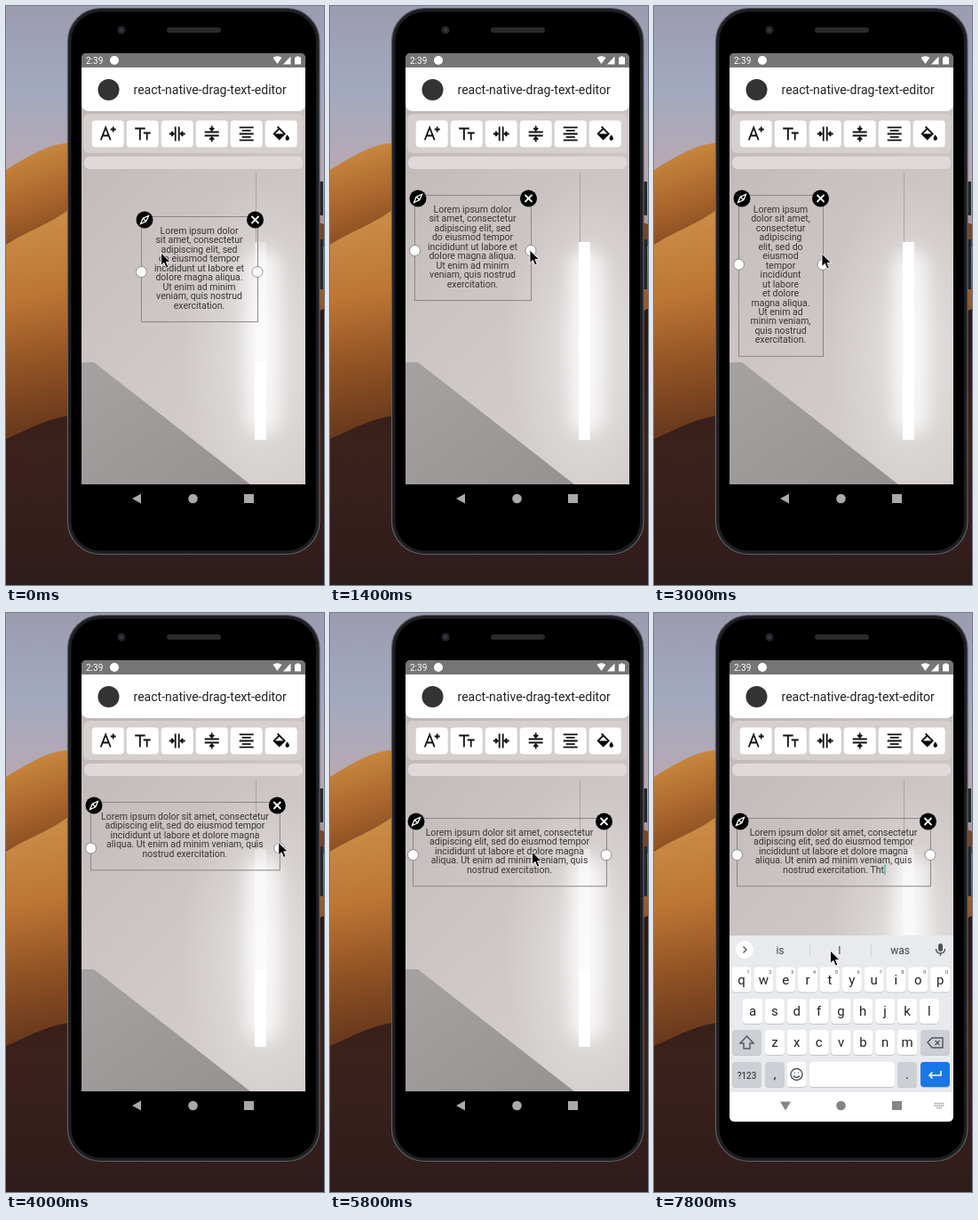
Write an HTML page that moves like this. It is 358x650 px and loops after 8000 ms.

```html
<!DOCTYPE html>
<html>
<head>
<meta charset="utf-8">
<style>
html, body { margin: 0; width: 100%; height: 100%; overflow: hidden; background: #2b1a18; }
svg { display: block; width: 358px; height: 650px; font-family: Roboto, sans-serif; }
.mid { text-anchor: middle; }
.line { fill: none; stroke: #111; stroke-width: 1.8; }
.thin { fill: none; stroke: #50555a; stroke-width: 1.4; }
</style>
</head>
<body>
<svg id="stage" viewBox="0 0 358 650">
  <defs>
    <linearGradient id="sky" x2="0" y2="1"><stop stop-color="#9c9bb0"/><stop offset=".35" stop-color="#a2a9bf"/><stop offset=".7" stop-color="#b9a9b2"/><stop offset="1" stop-color="#a58c92"/></linearGradient>
    <linearGradient id="duneA" gradientUnits="userSpaceOnUse" x1="15" y1="165" x2="50" y2="275"><stop stop-color="#c9883f"/><stop offset=".5" stop-color="#a9652c"/><stop offset="1" stop-color="#7a441f"/></linearGradient>
    <linearGradient id="duneB" gradientUnits="userSpaceOnUse" x1="10" y1="250" x2="50" y2="470"><stop stop-color="#c98b46"/><stop offset=".35" stop-color="#bd7534"/><stop offset=".7" stop-color="#8f5224"/><stop offset="1" stop-color="#6b3a1d"/></linearGradient>
    <linearGradient id="duneC" x2="0" y2="1"><stop stop-color="#2a1713"/><stop offset=".5" stop-color="#3c211c"/><stop offset="1" stop-color="#2f1c1b"/></linearGradient>
    <linearGradient id="wall" x2=".5" y2="1"><stop stop-color="#bcb5b4"/><stop offset=".45" stop-color="#c9c2c1"/><stop offset="1" stop-color="#d3cecc"/></linearGradient>
    <linearGradient id="floor" x2="1" y2="1"><stop stop-color="#a5a2a1"/><stop offset="1" stop-color="#959291"/></linearGradient>
    <radialGradient id="glow"><stop stop-color="#fff"/><stop offset=".35" stop-color="#fff" stop-opacity=".6"/><stop offset="1" stop-color="#fff" stop-opacity="0"/></radialGradient>
    <filter id="soft" x="-1" y="-.3" width="3" height="1.6"><feGaussianBlur stdDeviation="9"/></filter>
    <clipPath id="screen"><path d="M85 59q0-6 6-6H331q6 0 6 6V565q0 6-6 6H91q-6 0-6-6z"/></clipPath>
    <clipPath id="photo"><path d="M85 53H337V537H85z"/></clipPath>
  </defs>

  <rect width="358" height="270" fill="url(#sky)"/>
  <path d="M0 184C20 172 45 155 70 154L358 245V460H0z" fill="url(#duneA)"/>
  <path d="M0 268C25 252 45 247 70 229L358 270V500H0z" fill="url(#duneB)"/>
  <path d="M0 486C25 476 45 462 80 459L358 340V650H0z" fill="url(#duneC)"/>

  <path d="M353 197h4v38h-4zM353 262h4v56h-4z" fill="#24262a"/>
  <rect x="69.500" y="2.500" width="283.500" height="613" rx="37" fill="#1d1f22" stroke="#5d6065" stroke-width="1.200"/>
  <rect x="73.500" y="6.500" width="275.500" height="605" rx="33"/>
  <rect x="181" y="24" width="61" height="6" rx="3" fill="#292a2b"/>
  <circle cx="130" cy="27" r="4.5" fill="#222529"/><circle cx="130" cy="27" r="1.8" fill="#3a4047"/>

  <g clip-path="url(#screen)">
    <g clip-path="url(#photo)">
      <rect x="85" y="53" width="252" height="484" fill="url(#wall)"/>
      <ellipse cx="288" cy="378" rx="92" ry="185" fill="url(#glow)" opacity=".5"/>
      <rect x="270" y="274" width="38" height="206" rx="16" fill="#fff" opacity=".75" filter="url(#soft)"/>
      <path d="M85 400H99L275 537H85z" fill="url(#floor)"/>
      <path d="M281.5 187V265" stroke="#aaa5a4"/>
      <rect x="280" y="400" width="13" height="87" rx="1" fill="#fff"/>
      <rect id="tube" x="280" y="265" width="13" height="136" rx="1" fill="#fff"/>
    </g>

    <rect x="85" y="53" width="252" height="17" fill="#757575"/>
    <text x="90" y="65" font-size="10" fill="#fff">2:39</text>
    <circle cx="122" cy="61" r="5" fill="#fff"/>
    <path d="M300.500 58q5-3.500 10 0L305.500 65zM320.500 56.500V65.500H312zM325 57.500h2v-1h3v1h2V65.500h-7z" fill="#fff"/>

    <path d="M85 69H337V109q0 9-9 9H94q-9 0-9-9z" fill="#fff"/>
    <circle cx="115.500" cy="94" r="12" fill="#333"/>
    <text x="143.500" y="99" font-size="14.050" fill="#222">react-native-drag-text-editor</text>

    <rect x="87" y="121" width="248" height="44" rx="6" fill="#d5cfce"/>
    <rect x="88" y="169" width="246" height="14" rx="6" fill="#dfdad9"/>
    <g id="tools"></g>

    <g id="nav" transform="translate(0 553)" fill="#a9a9a9">
      <path d="M142 0L152-5.500V5.500z"/><circle cx="210.500" r="5.300"/><rect x="268" y="-5" width="11" height="10"/>
    </g>

    <g id="editor">
      <g id="copy" class="mid" font-size="10.5" fill="#383435"></g>
      <path id="caret" d="M0-9.500V2" stroke="#1f9c92"/>
      <g id="frame">
        <rect id="edge" x=".5" y=".5" fill="none" stroke="#8b8787"/>
        <circle class="grip" r="6" fill="#fff" stroke="#777" stroke-width=".8"/>
        <circle class="grip" r="6" fill="#fff" stroke="#777" stroke-width=".8"/>
        <g transform="translate(4 4)"><circle r="9.500"/><path d="M4.500-4.500L1.800 1.800L-4.500 4.500L-1.800-1.800zM-1.800-1.800L1.800 1.800" fill="none" stroke="#fff" stroke-width="1.300"/></g>
        <g id="close"><circle r="9.500"/><path d="M-4-4L4 4M4-4L-4 4" stroke="#fff" stroke-width="1.800"/></g>
      </g>
    </g>

    <g id="keyboard">
      <rect x="85" y="362" width="252" height="177" fill="#e8eaed"/>
      <rect x="85" y="538" width="252" height="33" fill="#fff"/>
      <g id="keys"></g>
      <circle cx="102" cy="378" r="10" fill="#fff"/>
      <path id="chevron" class="thin"/>
      <g id="icons" class="thin">
        <path d="M129 373h11v7l-4 4h-7zM140 380h-4v4M132 377h1M136 377h1M132 380q2 2 4 0"/>
        <path d="M201.500 374h9v10.500h-9zM204 372.500h4v2.500h-4M203.500 378h5M203.500 381h5"/>
        <circle cx="242" cy="378" r="3.600" stroke-width="2.400"/><circle cx="242" cy="378" r="5.400" stroke-dasharray="2.100 2.140" stroke-width="1.800"/>
        <path d="M282 378h.1M286.500 378h.1M291 378h.1" stroke-width="2.400" stroke-linecap="round"/>
        <text x="170" y="381.500" class="mid" font-size="9.500" font-weight="700" fill="#50555a" stroke="none">GIF</text>
      </g>
      <g id="hints" class="mid" font-size="12" fill="#3c4043">
        <path d="M175.500 371v15M244.500 371v15" stroke="#d3d6d9"/>
        <text x="142" y="382.500">is</text><text x="209" y="382.500">I</text><text x="277" y="382.500">was</text>
      </g>
      <rect x="320" y="371" width="5" height="9" rx="2.500" fill="#50555a"/>
      <path class="thin" d="M317.500 377q0 5 5 5t5-5M322.500 382v3"/>
      <g transform="translate(0 553)" fill="#858585">
        <path d="M142-4.500H154L148 5.500z"/><circle cx="210.500" r="5.300"/><rect x="268" y="-5" width="11" height="10"/>
        <path d="M315.500-2.500h11M315.500 0h11M318 2.500h6" stroke="#999" stroke-width="1.400" stroke-dasharray="1.600 .7"/>
      </g>
    </g>
  </g>
  <path id="pointer" d="M0 0V14.500L3.400 11.300L5.800 17L8.300 16L5.900 10.400H10.500z" stroke="#fff" stroke-width=".9"/>
</svg>
<script>
const $ = id => document.getElementById(id);
const show = (id, on) => { $(id).style.display = on ? '' : 'none'; };
const move = (el, x, y) => el.setAttribute('transform', `translate(${x} ${y})`);

// Eased value between [time, ...values] stops
function at(stops, t) {
  let i = 0;
  while (i < stops.length - 2 && t >= stops[i + 1][0]) i++;
  const [t0, ...a] = stops[i], [t1, ...b] = stops[i + 1];
  const k = Math.max(0, Math.min(1, (t - t0) / (t1 - t0)));
  const e = k * k * (3 - 2 * k);
  return a.map((v, j) => v + (b[j] - v) * e);
}

const LOOP = 8000, LEAD = 10.45, GRIP_LAG = 160;
const words = ('Lorem ipsum dolor sit amet, consectetur adipiscing elit, sed do eiusmod tempor ' +
  'incididunt ut labore et dolore magna aliqua. Ut enim ad minim veniam, quis nostrud exercitation.').split(' ');

// Words per line, up to each box width
const wraps = [
  [104, '231131112223221'], [122, '231232323321'], [160, '333343431'],
  [188, '5255541'], [210, '545661'], [999, '66672']
];
const wrapFor = w => wraps.find(r => w < r[0])[1];
const heightFor = w => 24 + wrapFor(w).length * LEAD;

const boxPos = [[0, 152, 236], [150, 152, 236], [560, 95, 212], [4350, 95, 212], [4800, 93, 230]];
const boxWidth = [[0, 131], [1400, 131], [2050, 197], [2400, 197], [3000, 95], [3300, 95], [4100, 218]];
const fade = [[0, 1], [4800, 1], [4950, .24], [5150, .24], [5300, 1]];
const pointerPath = [
  [0, 174.5, 277], [150, 174.5, 277], [600, 153.5, 272.5], [1000, 160, 272], [1400, 225, 274],
  [2050, 291, 260], [2200, 309.5, 266], [2400, 292, 262], [3000, 189, 278], [3300, 189, 290],
  [4100, 312, 256], [4350, 229, 250], [4800, 227.5, 268], [5900, 227.5, 268], [6400, 194, 412],
  [6800, 194, 412], [7500, 198.5, 379]
];
const typed = [[6800, ' '], [7150, ' T'], [7400, ' Th'], [7600, ' Tht']];

const tools = [
  'M-8 7L-2.500-7L3 7M-6 2H1M3-5H9M6-8V-2',
  'M-8.500-6H3M-2.800-6V7M1-1H9M5-1V7',
  'M-2-8V8M2-8V8M-9 0H-4M9 0H4M-6.500-2.500L-4 0L-6.500 2.500M6.500-2.500L4 0L6.500 2.500',
  'M-8-2H8M-8 2H8M0-9V-4M0 9V4M-2.500-6.500L0-4L2.500-6.500M-2.500 6.500L0 4L2.500 6.500',
  'M-8-7.200H8M-5-3.600H5M-8 0H8M-5 3.600H5M-8 7.200H8',
  'M-4-8L4 0L-2 6L-8 0L-2-6'
];
const paint = '<path d="M-8 0H4L-2 6zM7 1q4.500 5.500 0 6.500q-4.500-1 0-6.500"/>';
$('tools').innerHTML = tools.map((d, i) => `<g transform="translate(${114.7 + 39 * i} 143.500)">
  <rect x="-18" y="-15" width="36" height="30" rx="4" fill="#fff"/>
  <path class="line" d="${d}"/>${i == 5 ? paint : ''}</g>`).join('');

function key(x, y, label, w = 22, fill = '#fff', size = 15) {
  return `<rect x="${x - w / 2}" y="${y - 13}" width="${w}" height="28" rx="4" fill="#c4c7ca"/>
    <rect x="${x - w / 2}" y="${y - 14}" width="${w}" height="28" rx="4" fill="${fill}"/>
    <text class="mid" x="${x}" y="${y + 5}" font-size="${size}" fill="#222">${label}</text>`;
}
const row = (s, x, y) => [...s].map((c, i) => key(x + 24.85 * i, y, c)).join('');
const gray = '#ccd0d5';
$('keys').innerHTML = row('qwertyuiop', 98.5, 411.5) + row('asdfghjkl', 111, 447) + row('zxcvbnm', 136, 482) +
  [...'1234567890'].map((c, i) => `<text class="mid" x="${106 + 24.85 * i}" y="405" font-size="6" fill="#555">${c}</text>`).join('') +
  key(104.5, 482, '', 33, gray) + key(316.5, 482, '', 33, gray) +
  key(104.5, 518, '?123', 33, gray, 10) + key(136, 518, ',', 22, gray) + key(160.500, 518, '') +
  key(223, 518, '', 96) + key(285, 518, '.', 22, gray) + key(316.5, 518, '', 33, '#1877e6') +
  `<path class="thin" d="M104.500 475L112 483H108V489H101V483H97z"/>
   <path class="thin" d="M308 482L313 477H325V488H313zM316.500 480L321.500 485M321.500 480L316.500 485"/>
   <circle class="thin" cx="160.500" cy="518" r="6.500"/>
   <path class="thin" d="M158 516h.8M162.200 516h.8M157 519.500q3.500 4 7 0"/>
   <path d="M323 514V519H310M313.500 515.500L310 519L313.500 522.500" fill="none" stroke="#fff" stroke-width="1.600"/>`;

const lines = wraps[0][1].split('').map((_, i) => {
  const el = document.createElementNS('http://www.w3.org/2000/svg', 'text');
  el.setAttribute('y', 20 + i * LEAD);
  return $('copy').appendChild(el);
});
const grips = document.querySelectorAll('.grip');

function draw(t) {
  const [x, y] = at(boxPos, t), [w] = at(boxWidth, t);
  const h = heightFor(w);
  const selected = t < 200 || (t >= 1000 && t < 4350) || t >= 5300;
  const editing = t >= 6000;
  const extra = typed.reduce((s, [from, text]) => t >= from ? text : s, '');

  move($('editor'), x, y);
  $('copy').setAttribute('opacity', at(fade, t)[0]);
  const counts = wrapFor(w);
  let n = 0;
  lines.forEach((el, i) => {
    const count = +(counts[i] || 0), last = i == counts.length - 1;
    el.textContent = words.slice(n, n + count).join(' ') + (last ? extra : '');
    el.setAttribute('x', w / 2);
    n += count;
  });

  show('caret', editing);
  if (editing) {
    const end = lines[counts.length - 1];
    move($('caret'), w / 2 + end.getComputedTextLength() / 2 + 1, 20 + (counts.length - 1) * LEAD);
  }

  show('frame', selected);
  $('edge').setAttribute('width', w);
  $('edge').setAttribute('height', h);
  // Grips follow the height of an earlier layout pass
  const gripY = heightFor(at(boxWidth, Math.max(0, t - GRIP_LAG))[0]) / 2 + 3.5;
  move(grips[0], .5, gripY);
  move(grips[1], w, gripY);
  move($('close'), w - 2.5, 4);
  $('tube').setAttribute('opacity', selected && x + w > 270 ? .35 : 1);

  show('keyboard', t >= 5900);
  move($('keyboard'), 0, at([[5900, 210], [6150, 0]], t)[0]);
  const hinting = t >= 6800;
  show('icons', !hinting);
  show('hints', hinting);
  $('chevron').setAttribute('d', hinting ? 'M100.500 374.500L104 378L100.500 381.500' : 'M103.500 374.500L100 378L103.500 381.500');

  move($('pointer'), ...at(pointerPath, t));
}

const start = performance.now();
function tick() {
  draw((performance.now() - start) % LOOP);
  requestAnimationFrame(tick);
}
tick();
</script>
</body>
</html>
```
